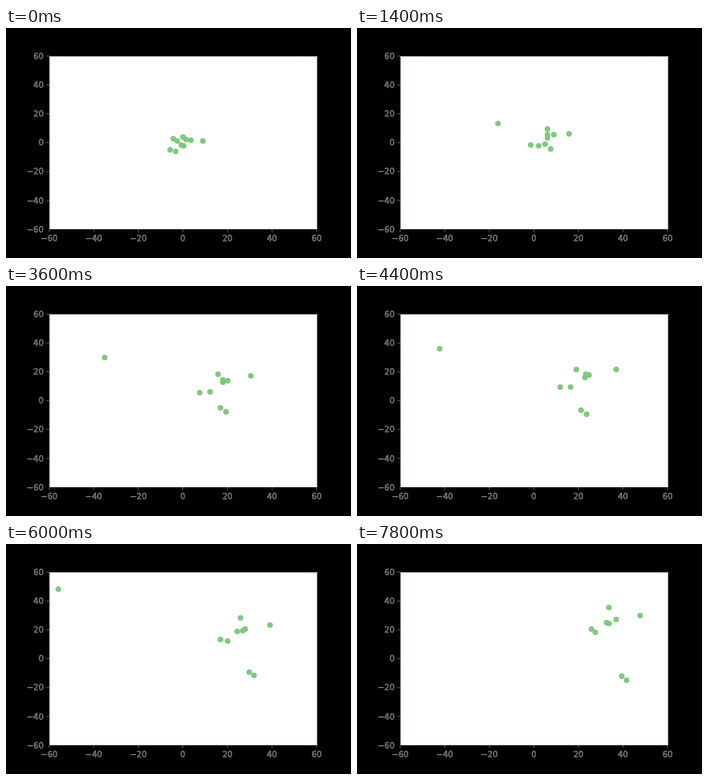
These frames come from a looping animation (432x288 px, 8000 ms). An HTML page:

```html
<!DOCTYPE html>
<html lang="en">
<head>
<meta charset="utf-8">
<title>Drifting points</title>
<style>
  html, body { margin: 0; width: 100%; height: 100%; overflow: hidden; background: #000; }
  svg { display: block; width: 100%; height: 100%; }
  text { font: 10px "DejaVu Sans", sans-serif; fill: #333; stroke: #999; stroke-width: .5; }
  .tick { stroke: #777; stroke-width: .8; }
  .edge { stroke: #808f80; fill: none; }
  .dot { fill: #7fc97f; }
</style>
</head>
<body>
<svg viewBox="0 0 432 288">
  <clipPath id="area"><rect x="54" y="35" width="336" height="217"/></clipPath>
  <rect width="432" height="288" fill="#000"/>
  <rect x="54" y="35" width="336" height="217" fill="#fff"/>
  <path class="edge" d="M54.5 252V35.5H389.5V252"/>
  <g id="axes"></g>
  <g id="dots" clip-path="url(#area)"></g>
</svg>
<script>
const LOOP = 8000, STEP = 200, LAST = LOOP / STEP - 1;
const NS = "http://www.w3.org/2000/svg";
const axes = document.getElementById("axes");
const dots = document.getElementById("dots");

function add(parent, tag, attrs, text) {
  const el = document.createElementNS(NS, tag);
  for (const k in attrs) el.setAttribute(k, attrs[k]);
  if (text !== undefined) el.textContent = text;
  parent.appendChild(el);
  return el;
}

function drawAxes() {
  for (let v = -60; v <= 60; v += 20) {
    const label = String(v).replace("-", "\u2212");
    const x = 221.5 + v * 2.79, y = 143.6 - v * 1.808;
    add(axes, "path", { class: "tick", d: `M${x} 252v3.5` });
    add(axes, "text", { x, y: 266.7, "text-anchor": "middle" }, label);
    if (v > -60) add(axes, "path", { class: "tick", d: `M54 ${y}h-3.5` });
    add(axes, "text", { x: 47, y: y + 3.6, "text-anchor": "end" }, label);
  }
}

// Every point keeps its heading; surge and lag (in steps) vary its pace
const point = (x, y, dx, dy, surge = 0, lag = 0) => ({
  x, y, dx, dy, surge, lag, el: add(dots, "circle", { class: "dot", r: 3.5 })
});
const points = [
  point(209.9, 138.9, -4.815, -2.75),
  point(222, 147.3, 2.96, .585),
  point(214.5, 141.5, 3, .622),
  point(221.8, 136.6, 2.405, -1.46),
  point(205.5, 152.5, 2.26, -1.18, 3.5, 3.5),
  point(212.5, 154.5, 2.21, -1.13, 3.6, .7),
  point(225.5, 139.5, 2.23, -1.05, 7.6, 1.8),
  point(231.5, 140.5, 2.15, -1.05, 6),
  point(219.5, 146.4, 2.68, -1.32, 2.6),
  point(246.5, 141.5, 2.78, -1.33, 6.3)
];

const snap = v => Math.floor(v) + .5;

function render(t) {
  const n = Math.floor((t % LOOP) / STEP);
  const bump = Math.exp(-(((n - 21) / 4) ** 2));
  const bow = Math.sin(Math.PI * n / LAST);
  for (const p of points) {
    const m = n + p.surge * bump - p.lag * bow;
    p.el.setAttribute("cx", snap(p.x + p.dx * m));
    p.el.setAttribute("cy", snap(p.y + p.dy * m));
  }
}

drawAxes();
const start = performance.now();
function tick() {
  render(performance.now() - start);
  requestAnimationFrame(tick);
}
tick();
</script>
</body>
</html>
```
